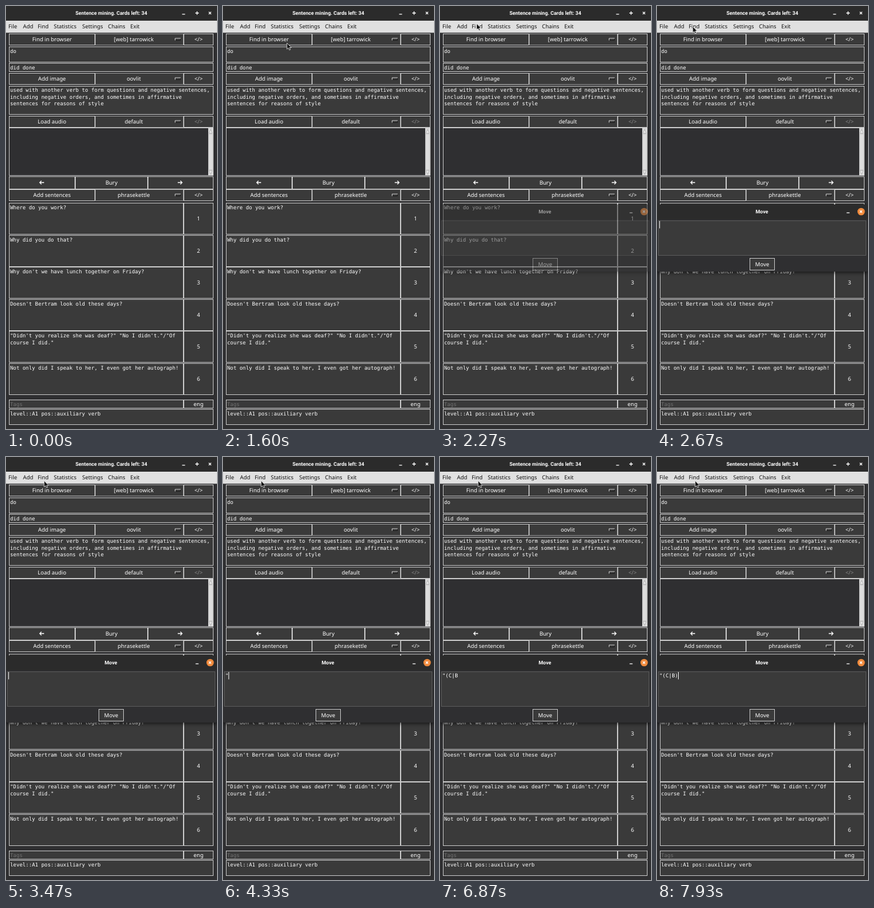
Write an HTML page that moves like this. It is 360x720 px and loops after 8000 ms.

```html
<!DOCTYPE html>
<html lang="en">
<head>
<meta charset="utf-8">
<title>Sentence mining</title>
<style>
  html, body { margin: 0; width: 100%; height: 100%; overflow: hidden; background: #2f2f31; }
  svg { display: block; width: 360px; height: 720px; }
  text { font: 9.35px "Noto Sans", sans-serif; fill: #fff; text-rendering: geometricPrecision; white-space: pre; }
  .mono { font: 8.86px "DejaVu Sans Mono", monospace; }
  .title { font: 700 8.67px Roboto, sans-serif; }
  .mid { text-anchor: middle; }
  .menu { fill: #111; }
  .dim { fill: #8a8a8a; }
  .hint { fill: #707070; }
  .box { fill: #3a3a3a; stroke: #dcdcdc; stroke-width: .9; }
  .option .box { stroke: #a8a8a8; }
  .icon { fill: none; stroke: #fff; stroke-width: 1.3; }
  .caret { fill: #fff; }
  #dialog { filter: drop-shadow(0 2px 3px rgba(0, 0, 0, .6)); }
</style>
</head>
<body>
<svg id="stage" viewBox="0 0 360 720"></svg>
<script>
const CHAR = 5.333, LINE = 11.6;

const rect = (x, y, w, h, fill, more = '') =>
  `<rect x="${x}" y="${y}" width="${w}" height="${h}" fill="${fill}" ${more}/>`;
const box = (x1, y1, x2, y2, more = '') =>
  `<rect class="box" x="${x1 + .5}" y="${y1 + .5}" width="${x2 - x1 - 1}" height="${y2 - y1 - 1}" ${more}/>`;
const esc = s => s.replace(/&/g, '&amp;').replace(/</g, '&lt;').replace(/>/g, '&gt;');
const text = (x, y, s, cls = 'mid', more = '') =>
  `<text x="${x}" y="${y}" class="${cls}" ${more}>${esc(s)}</text>`;
const mono = (x, y, s, cls = '') =>
  s.split('\n').map((line, i) => text(x, y + i * LINE, line, 'mono ' + cls)).join('');
const button = (x1, y1, x2, y2, s, cls = 'mid') =>
  box(x1, y1, x2, y2) + text((x1 + x2) / 2, (y1 + y2) / 2 + 3.1, s, cls);
const cross = y => `<path class="icon" d="M346 ${y - 2}l4 4m0 -4l-4 4"/>`;
const dash = (x, y) => `<path class="icon" d="M${x} ${y}h5"/>`;
const orange = (y, id = '') => `<circle ${id} cx="348.3" cy="${y}" r="6.3" fill="#f08a3c"/>`;

const optionMenu = (y, choice) => `<g class="option">
  ${box(152, y, 303, y + 20)}${text(218, y + 13.1, choice)}
  <path d="M289.5 ${y + 11.5}h8v-3" fill="none" stroke="#1c1c1c"/>
  <path d="M288.5 ${y + 11.5}v-3.5h9.5" fill="none" stroke="#cfcfcf"/></g>`;

// Button, option menu and source toggle on one line
const toolRow = (y, action, choice, cls = 'mid') =>
  optionMenu(y, choice) +
  button(5, y, 152, y + 20, action) +
  button(303, y, 354, y + 20, '</>', cls);

const menuBar = [[4, 'File'], [29, 'Add'], [54, 'Find'], [81.5, 'Statistics'],
  [130, 'Settings'], [174, 'Chains'], [212, 'Exit']];

const sentences = [
  'Where do you work?',
  'Why did you do that?',
  "Why don't we have lunch together on Friday?",
  "Doesn't Bertram look old these days?",
  '"Didn\'t you realize she was deaf?" "No I didn\'t."/"Of\ncourse I did."',
  'Not only did I speak to her, I even got her autograph!'
];

const sentenceRow = (s, i) => {
  const y = Math.round(335 + i * 54.6);
  return box(5, y, 303, y + 54, i ? '' : 'id="first"') + mono(7, y + 11, s) +
    button(303, y, 354, y + 54, String(i + 1));
};

const scrollbar =
  rect(345, 208, 8.5, 80, '#d9d9d9') +
  rect(346, 218, 6.5, 61, '#dedede', 'stroke="#b4b4b4" stroke-width=".6"') +
  '<path d="M349.2 210l3 6.5h-6zM349.2 286.5l3 -6.5h-6z" fill="#e8e8e8" stroke="#999" stroke-width=".6"/>';

const mainWindow =
  rect(0, 0, 360, 720, '#2f2f31') + rect(0, 0, 360, 25, '#2b2b2b') +
  text(179.7, 15.2, 'Sentence mining. Cards left: 34', 'mid title') +
  dash(300.5, 14) + '<path class="icon" d="M323 12h6m-3 -3v6"/>' +
  orange(12, 'id="active"') + cross(12) +
  rect(0, 25, 360, 20.5, '#e0e0e0') + rect(50, 27, 27, 17, '#f4f4f4', 'id="hover"') +
  menuBar.map(([x, s]) => text(x, 38.2, s, 'menu')).join('') +
  toolRow(47, 'Find in browser', '[web] tarrowick') +
  box(5, 69, 354, 96) + mono(7, 80, 'do') +
  box(5, 97, 354, 112) + mono(7, 108, 'did done') +
  toolRow(114, 'Add image', 'oovlit') +
  box(5, 136, 354, 185) +
  mono(7, 146, 'used with another verb to form questions and negative sentences,\n' +
    'including negative orders, and sometimes in affirmative\nsentences for reasons of style') +
  toolRow(187, 'Load audio', 'default', 'mid dim') +
  box(5, 207, 354, 289, 'style="fill:#2f2f31"') + scrollbar +
  box(5, 290, 118, 312) + button(118, 290, 242, 312, 'Bury') + box(242, 290, 354, 312) +
  '<path class="icon" d="M65 300.5h-7.5m3 -3l-3 3l3 3M293 300.5h7.5m-3 -3l3 3l-3 3"/>' +
  toolRow(312, 'Add sentences', 'phrasekettle') +
  sentences.map(sentenceRow).join('') +
  `<rect id="mainCaret" class="caret" x="${7 + 18 * CHAR}" y="337" width="1" height="12"/>` +
  box(5, 670, 303, 685) + mono(7, 681, 'Tags', 'hint') + button(303, 670, 354, 685, 'eng') +
  box(5, 686, 354, 713) + mono(7, 697, 'level::A1 pos::auxiliary verb');

const dialog = `<g id="dialog">
  ${rect(0, 338, 359.5, 114, '#2f2f31', 'rx="2"')}${rect(0, 338, 359.5, 25, '#2b2b2b', 'rx="2"')}
  ${text(179, 353.2, 'Move', 'mid title')}
  ${dash(323.5, 352)}${orange(350)}${cross(350)}
  ${box(2, 365, 357, 425, 'style="stroke:#606060"')}
  ${text(4, 375, '', 'mono', 'id="typed"')}
  <rect id="caret" class="caret" y="366" width="1" height="12.5"/>
  ${button(158, 429, 201, 450, 'Move')}
</g>`;

const pointer = '<path id="pointer" d="M0 0V10.5L2.5 8.3L4.2 12L6 11.2L4.4 7.7H7.6Z"' +
  ' fill="#111" stroke="#eee" stroke-width=".8"/>';

const stage = document.getElementById('stage');
stage.innerHTML = mainWindow + dialog + pointer;
const $ = id => document.getElementById(id);
const show = (id, on) => { $(id).style.opacity = Number(on); };

// All times below are ticks of 1/15 s
const TICK = 1000 / 15, LOOP = 120;
const keys = [[63, '"'], [75, '('], [85, 'C'], [93, '|'], [102, 'B'], [111, ')']];
const path = [[19, 326, 208], [20, 250, 156], [21, 200, 123], [22, 160, 96], [23, 129, 75],
  [24, 109, 63], [26, 85, 47], [29, 65, 32], [31, 62.5, 30], [36, 62.5, 30],
  [40, 61, 35], [47, 65, 40.5], [LOOP, 65, 40.5]];

function pointerAt(n) {
  const i = path.findIndex(p => p[0] > n);
  if (i < 1) return [-20, -20];
  const [a, x, y] = path[i - 1], [b, x2, y2] = path[i], f = (n - a) / (b - a);
  return [x + (x2 - x) * f, y + (y2 - y) * f];
}

function draw() {
  const n = Math.floor((performance.now() + 4) / TICK) % LOOP;
  const focused = n >= 31 && n < 34;
  const typed = keys.filter(k => k[0] <= n).map(k => k[1]).join('');

  show('hover', n >= 28 && n < 34);
  show('active', focused);
  show('mainCaret', focused);
  $('first').style.stroke = focused ? '#161616' : '';
  show('dialog', n < 34 ? 0 : n < 35 ? .5 : 1);
  // 600 ms on, 300 ms off
  show('caret', n >= 38 && (n - 38) % 13.5 < 9);
  $('caret').setAttribute('x', 4 + typed.length * CHAR);
  $('typed').textContent = typed;
  $('pointer').setAttribute('transform', `translate(${pointerAt(n)})`);
  requestAnimationFrame(draw);
}
draw();
</script>
</body>
</html>
```
